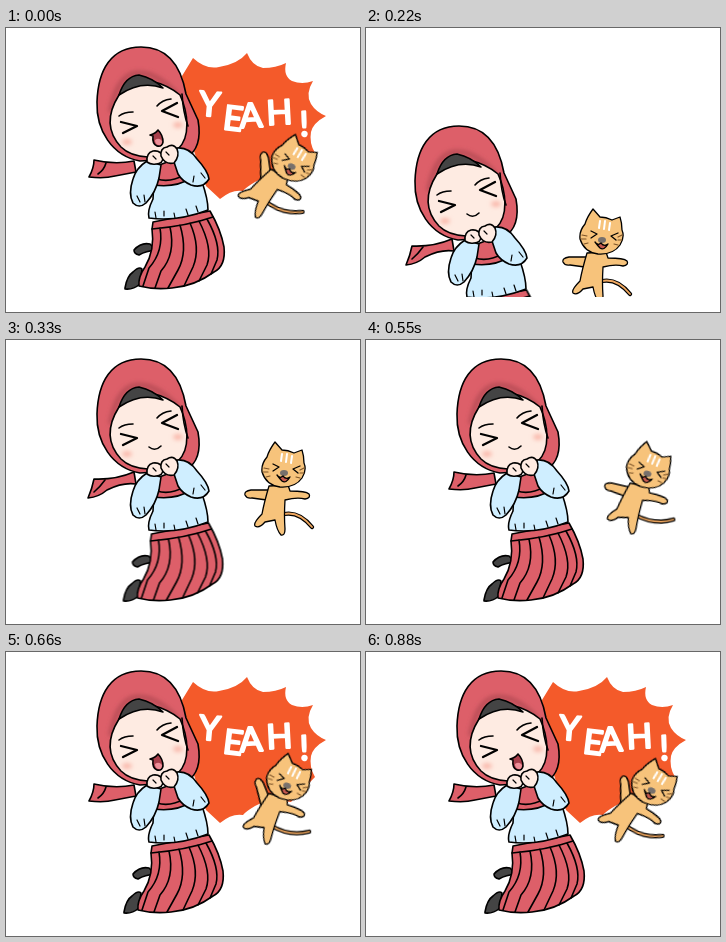
An HTML page that plays this animation: 354x284 px, repeating every 990 ms.

```html
<!DOCTYPE html>
<html lang="en">
<head>
<meta charset="utf-8">
<title>Yeah!</title>
<style>
html, body { margin: 0; width: 100%; height: 100%; overflow: hidden; background: #fff; }
svg { display: block; width: 354px; height: 284px; }
path, ellipse { stroke: #000; stroke-width: 1.6; stroke-linejoin: round; stroke-linecap: round; }
.red { fill: #dd5f69; }
.blue { fill: #cfeeff; }
.skin { fill: #feebe2; }
.dark { fill: #444; }
.fur { fill: #f7c37b; }
.line { fill: none; }
.bold { fill: none; stroke-width: 2.3; }
.thin { fill: none; stroke-width: 1.2; }
.flat { stroke: none; }
.cat path { stroke-width: 1.3; }
.cat .tabby { fill: none; stroke: #7d5429; stroke-width: 1.2; }
.cat .white { fill: none; stroke: #fff; stroke-width: 2; }
.cat .tail-edge { fill: none; stroke-width: 4.2; }
.cat .tail-fur { fill: none; stroke: #f0a860; stroke-width: 1.8; }
.lettering { font: 34px Lato, "Open Sans", sans-serif; fill: #fff; stroke: #fff; stroke-width: 2.2; stroke-linejoin: round; }

.slide, .cheer, .calm, .droop, .wave, .skirt, .cat, .head, .arm, .tail, .curl, .trail {
  animation: 990ms step-end infinite;
}
.slide { animation-name: slide; }
.cheer { animation-name: cheer; }
.calm { animation-name: calm; }
.droop, .curl { animation-name: early; }
.wave, .trail { animation-name: late; }
.skirt { animation-name: sway; }
.cat { animation-name: cat; }
.head { animation-name: head; }
.arm { animation-name: arm; }
.trail { animation-name: late, level; }

@keyframes slide {
  0%, 33.3333% { transform: none; }
  11.1111% { transform: translate(-84px, 158px); }
  22.2222% { transform: translate(-42px, 79px); }
}
@keyframes cheer { 0%, 66.6666% { visibility: visible; } 11.1111% { visibility: hidden; } }
@keyframes calm { 0%, 66.6666% { visibility: hidden; } 11.1111% { visibility: visible; } }
@keyframes early { 0%, 44.4444% { visibility: hidden; } 11.1111% { visibility: visible; } }
@keyframes late { 0%, 44.4444% { visibility: visible; } 11.1111% { visibility: hidden; } }
@keyframes sway {
  0%, 88.8888% { transform: translate(1px, 0); }
  11.1111% { transform: translate(-.5px, 0); }
  44.4444% { transform: none; }
}
@keyframes cat {
  0%, 88.8888% { transform: translate(288px, 133px) rotate(32deg); }
  11.1111% { transform: translate(278px, 127px); }
  44.4444% { transform: translate(281px, 127px) rotate(7deg); }
  55.5555% { transform: translate(283px, 128px) rotate(13deg); }
  66.6666% { transform: translate(283px, 128px) rotate(18deg); }
  77.7777% { transform: translate(286px, 131px) rotate(25deg); }
}
@keyframes head {
  0%, 88.8888% { transform: rotate(-9deg); }
  11.1111%, 66.6666% { transform: none; }
  55.5555% { transform: rotate(2deg); }
  77.7777% { transform: rotate(-4deg); }
}
@keyframes arm {
  0%, 66.6666% { transform: translate(-15px, 27px) rotate(50deg); }
  11.1111% { transform: translate(-15px, 27px); }
}
@keyframes level {
  0%, 88.8888% { transform: translate(0, 48px) rotate(-25deg); }
  11.1111%, 44.4444% { transform: translate(0, 48px) rotate(-7deg); }
  55.5555% { transform: translate(0, 48px) rotate(-15deg); }
  66.6666% { transform: translate(0, 48px) rotate(-18deg); }
  77.7777% { transform: translate(0, 48px) rotate(-22deg); }
}
</style>
</head>
<body>
<svg viewBox="0 0 354 284">
  <defs>
    <clipPath id="stage"><rect x="25" y="0" width="310" height="269"/></clipPath>
    <clipPath id="hood"><path d="M135 19C105 19 92 42 91 74C90 102 106 128 134 133L180 130Q197 120 192 92L180 66C175 38 162 19 135 19Z"/></clipPath>
    <filter id="soft" x="-50%" y="-50%" width="200%" height="200%"><feGaussianBlur stdDeviation="2"/></filter>
  </defs>
  <g clip-path="url(#stage)"><g class="slide">

    <g class="cheer">
      <path class="flat" fill="#f45a2a" d="M176 48L187 30Q200 42 213 39Q232 36 241 25Q246 38 257 40Q270 40 280 35Q277 48 286 53Q296 57 307 53Q299 66 305 76Q310 84 320 88Q307 95 305 104Q303 115 309 125L285 150Q262 146 249 154Q239 160 237 163Q226 161 214 171L200 158L180 100Z"/>
      <text class="lettering" x="192 216 234 261 294" y="87 101 100 97 108" rotate="5 7 -3 -3 -2">YEAH!</text>
    </g>

    <g class="skirt">
      <path class="dark" d="M127 222Q134 214 143 216L149 222Q139 223 132 227Q127 226 127 222Z"/>
      <path class="dark" d="M118 260Q120 248 126 244Q132 238 135 241L133 256Q126 262 118 261Z"/>
      <path class="red" d="M146 194L203 183Q214 202 217 219Q219 238 207 244Q188 258 165 260Q148 262 132 258Q131 249 138 239Q148 222 145 201Z"/>
      <path class="line" d="M145 201Q180 198 206 189M153 200Q157 223 142 240L136 258M163 199Q169 226 154 243L148 260M173 197Q181 224 171 242L161 260M183 195Q194 220 186 239L177 258M192 193Q206 220 200 237L192 253M200 191Q214 216 210 232L204 246"/>
    </g>

    <path class="blue" d="M148 152L147 171Q141 183 143 190Q171 194 202 182Q202 171 196 154L180 143Z"/>
    <path class="thin" d="M149 184l1 6M158 183l0 5M168 185l1 5M180 181l2 6M190 178l2 6"/>
    <path class="red" d="M148 139Q151 151 148 157Q170 160 185 150L172 130Z"/>
    <path class="line" d="M151 151Q164 155 178 147"/>

    <path class="red droop" d="M128 132Q109 140 88 139Q86 149 82 158Q93 157 101 150Q117 142 130 144Z"/>
    <path class="red wave" d="M128 133Q109 137 88 132Q88 140 83 149Q98 151 109 148L130 144Z"/>
    <path class="line droop" d="M99 140Q94 147 88 152"/>
    <path class="line wave" d="M100 135Q98 142 92 146"/>

    <path class="red" d="M135 19C105 19 92 42 91 74C90 102 106 128 134 133L180 130Q197 120 192 92L180 66C175 38 162 19 135 19Z"/>
    <g clip-path="url(#hood)">
      <path class="line" style="stroke:#b94d57;stroke-width:5" filter="url(#soft)" d="M105 82Q112 45 133 45Q153 45 174 70"/>
    </g>
    <path class="skin" d="M113 67C101 86 101 104 115 119C127 131 156 133 172 121C185 109 182 84 174 67Q162 57 145 53Q126 51 113 67Z"/>
    <path class="dark" d="M113 67Q119 48 133 47Q147 50 157 60Q135 52 113 67Z"/>
    <path class="line" d="M176 66Q177 84 182 98"/>
    <g class="flat" filter="url(#soft)" fill="#f9b7aa">
      <ellipse class="flat" cx="172" cy="97" rx="5" ry="3"/>
      <ellipse class="flat" cx="121" cy="114" rx="5" ry="3"/>
    </g>
    <path class="line" d="M113 88Q118 84 127 84M151 78Q156 72 165 71"/>
    <path class="bold" d="M115 94L131 98L117 105M171 75L156 83L172 89"/>
    <path class="line calm" d="M143 107Q149 112 155 106"/>
    <g class="cheer">
      <path fill="#a83f4b" d="M144 107Q149 106 152 102Q157 107 157 114Q156 119 151 118Q146 116 147 108Z"/>
      <path class="flat" fill="#ed8e98" d="M149 112Q153 109 156 113Q156 118 152 117Q149 116 149 112Z"/>
    </g>

    <path class="blue" d="M141 133Q130 140 127 151Q122 166 127 175Q133 181 140 175Q150 164 153 150L155 137Z"/>
    <path class="blue" d="M171 120Q183 119 191 131Q202 143 203 151Q197 161 185 157Q176 153 172 146L168 134Z"/>
    <path class="thin" d="M131 168l3 6M138 167l1 7M188 148l-1 6M195 145l4 5"/>
    <path class="skin" d="M141 134Q140 125 147 123Q155 122 157 129Q157 136 150 136Q145 137 141 134Z"/>
    <path class="skin" d="M155 128Q154 120 161 119Q167 115 171 121Q174 128 168 135Q159 137 155 128Z"/>
    <path class="thin" d="M147 128l3 3M160 124l3 3"/>

    <g class="cat">
      <g class="curl">
        <path class="tail-edge" d="M0 47Q15 44 28 60"/>
        <path class="tail-fur" d="M0 47Q15 44 28 60"/>
      </g>
      <g class="trail">
        <path class="tail-edge" d="M-3 0Q15 11 35 6"/>
        <path class="tail-fur" d="M-3 0Q15 11 35 6"/>
      </g>
      <g class="arm"><path class="fur" d="M5 -4L-18 -4Q-25 -3 -24 1Q-22 5 -17 4L5 7Z"/></g>
      <path class="fur" d="M-15 19Q-20 36 -22 47Q-31 56 -29 59Q-25 62 -19 55L-9 53Q-7 64 -3 68Q1 69 1 62Q0 49 1 33Q13 30 21 32Q27 31 25 27Q22 24 6 24L4 18Z"/>
      <g class="head">
        <path class="fur" d="M-9 -25Q-15 -17 -17 -10Q-23 -3 -22 5Q-18 18 -4 20Q11 21 18 11Q23 3 20 -4Q20 -11 18 -17L10 -14Q4 -17 -2 -17Z"/>
        <path class="white" d="M-2 -13L-3 -6M3 -13L2 -5M8 -11L7 -4"/>
        <path class="tabby" d="M-20 1l5 1M-21 5l5 0M-18 10l4 -1M20 1l-4 2M20 6l-4 0M16 11l-4 -1"/>
        <path class="bold" d="M-11 -3L-5 0L-11 4M16 -1L9 2L14 6"/>
        <ellipse class="flat" cx="0" cy="6" rx="4" ry="3" fill="#77706c"/>
        <path fill="#c75a50" d="M-7 8Q-4 12 -1 9Q2 13 6 10Q2 17 -2 14Q-4 12 -7 8Z"/>
      </g>
    </g>

  </g></g>
</svg>
</body>
</html>
```
